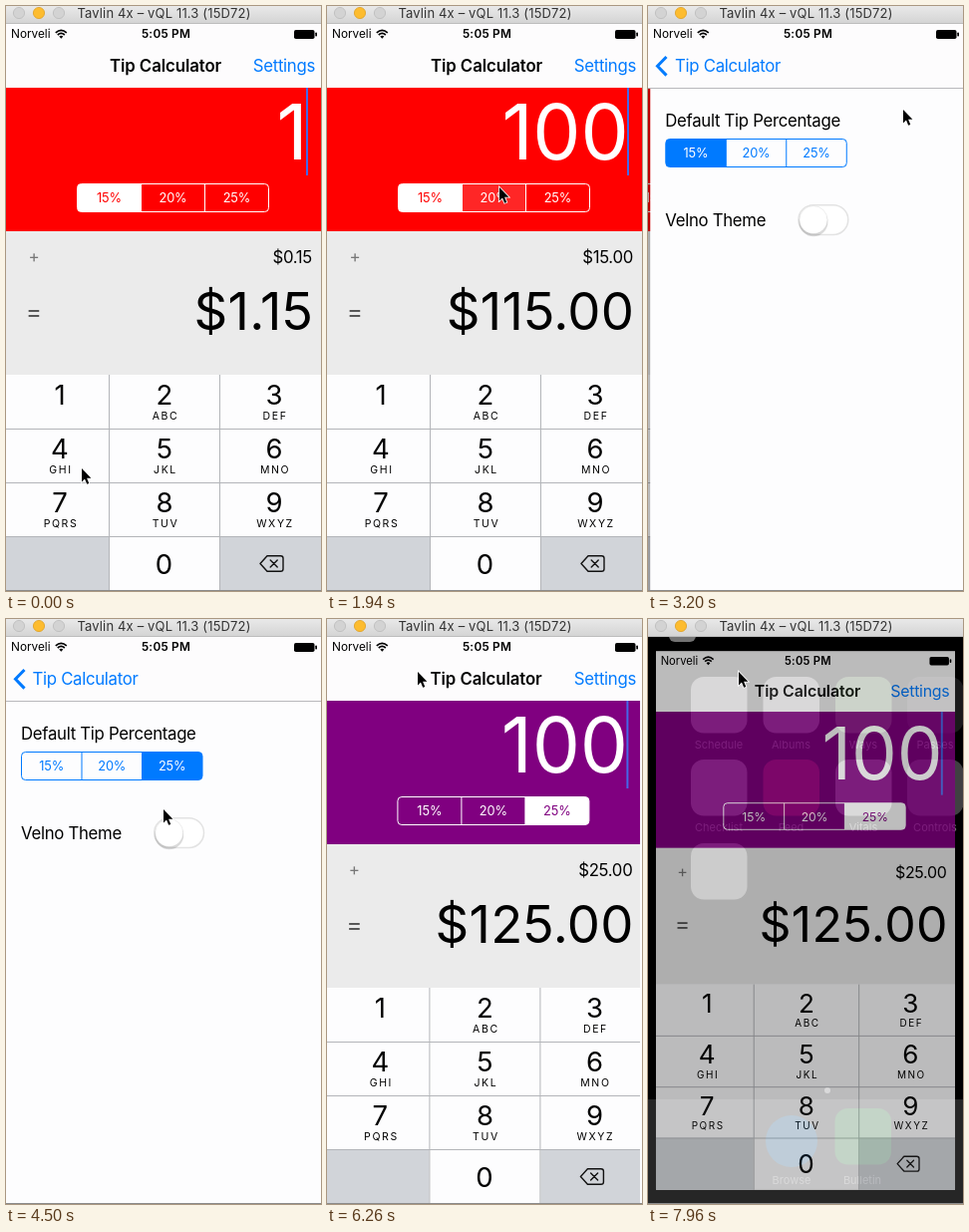
Animation, 316 px wide and 587 px high, one loop 8 s. Source, as an HTML page:

```html
<!DOCTYPE html>
<html lang="en">
<head>
<meta charset="utf-8">
<title>Tip Calculator</title>
<style>
html, body { margin: 0; width: 100%; height: 100%; overflow: hidden; background: #000; }
svg { display: block; width: 316px; height: 587px; font-family: Inter, Roboto, "Open Sans", sans-serif; }
.body { font-size: 16.8px; letter-spacing: -.31px; }
.bold { font-size: 16.8px; font-weight: 600; letter-spacing: -.08px; }
.small { font-size: 12.8px; letter-spacing: -.1px; }
.bar { font-size: 11.8px; }
.digit { font-size: 27.5px; }
.abc { font-size: 10.5px; letter-spacing: 1.6px; }
.label { font-size: 11px; fill: #fff; }
.mid { text-anchor: middle; }
.end { text-anchor: end; }
</style>
</head>
<body>
<svg id="stage" viewBox="0 0 316 587" xmlns="http://www.w3.org/2000/svg"></svg>
<script>
const LOOP = 8000, BLUE = '#007aff', RED = '#ff0000', PURPLE = '#800080';

const text = (x, y, cls, str, attrs = '') =>
  `<text x="${x}" y="${y}" class="${cls}" ${attrs}>${str}</text>`;
const rect = (x, y, w, h, fill, attrs = '') =>
  `<rect x="${x}" y="${y}" width="${w}" height="${h}" fill="${fill}" ${attrs}/>`;

// Three-part segmented control
function segments(id, x, y, w, h) {
  const cw = w / 3;
  const cells = [15, 20, 25].map((n, i) =>
    rect(x + i * cw, y, cw, h, 'none', `id="${id}Cell${i}"`) +
    text(x + (i + .5) * cw, y + 18.8, 'small mid', n + '%', `id="${id}Text${i}"`)).join('');
  const lines = [1, 2].map(i => `M${x + i * cw} ${y}v${h}`).join('');
  return `<clipPath id="${id}Clip">${rect(x, y, w, h, '#000', 'rx="4"')}</clipPath>
    <g clip-path="url(#${id}Clip)">${cells}</g>
    <g id="${id}Frame" fill="none">${rect(x, y, w, h, 'none', 'rx="4"')}<path d="${lines}"/></g>`;
}

function keypad() {
  const cols = [54, 159, 269];
  const letters = ['', 'ABC', 'DEF', 'GHI', 'JKL', 'MNO', 'PQRS', 'TUV', 'WXYZ'];
  const keys = letters.map((abc, i) => {
    const x = cols[i % 3], y = 400 + 54 * Math.floor(i / 3);
    return text(x, y, 'digit mid', i + 1) + text(x + 1, y + 15, 'abc mid', abc);
  }).join('');
  return rect(0, 370, 316, 217, '#fdfdfe') +
    rect(0, 532, 103, 55, '#d1d4d9') + rect(215, 532, 101, 55, '#d1d4d9') +
    rect(104, 533, 110, 54, '#fdfdfe', 'id="zero"') +
    '<path d="M103.5 370V587M214.5 370V587M0 424.5H316M0 478.5H316M0 532.5H316" stroke="#b3b5b9"/>' +
    keys + text(158.5, 569.5, 'digit mid', '0') +
    `<g fill="none" stroke="#111" stroke-width="1.4" stroke-linejoin="round" stroke-linecap="round">
      <path d="M255 559.5L262 551.7H275.5Q278 551.7 278 554V565Q278 567.3 275.5 567.3H262Z"/>
      <path d="M265.2 556l7 7M272.2 556l-7 7"/></g>`;
}

function springboard() {
  const cols = [43, 115.5, 188, 260];
  const apps = [
    ['Schedule', '#fff'], ['Albums', '#fff'], ['Ways', '#8fce7e'], ['Passes', '#3a3a3c'],
    ['Checklist', '#fff'], ['Feed', '#ff3b5c'], ['Vitals', '#fff'], ['Controls', '#8e8e93']
  ];
  const icon = (x, y, c) => rect(x, y, 56.5, 56.5, c, 'rx="13"');
  return rect(0, 482, 316, 105, '#555') + apps.map(([name, c], i) => {
    const x = cols[i % 4], y = i < 4 ? 58 : 141;
    return icon(x, y, c) + text(x + 28, y + 72, 'label mid', name);
  }).join('') + icon(43, 225, '#fff') + rect(21, 6, 27, 17, '#fff', 'rx="6"') +
    '<circle cx="180" cy="473" r="3" fill="#fff"/>' +
    '<circle cx="144" cy="524" r="26" fill="#1e9bf6"/>' + icon(187.5, 491, '#4cd964') +
    text(144, 567, 'label mid', 'Browse') + text(215, 567, 'label mid', 'Bulletin');
}

const home = `<g id="home">
  ${rect(0, 82, 316, 144, RED, 'id="panel"')}
  ${rect(0, 226, 316, 144, '#ebebeb')}
  ${text(302.5, 154, 'end', '', 'id="bill" font-size="76.5" letter-spacing="-.2" fill="#fff"')}
  ${rect(301, 82, 2, 88, '#4468e8', 'id="caret"')}
  ${segments('home', 71.5, 178.5, 192, 28)}
  ${text(28, 257, 'mid', '+', 'font-size="17" fill="#777"')}
  ${text(28, 314.7, 'mid', '=', 'font-size="24" fill="#555"')}
  ${text(307, 257.5, 'body end', '', 'id="tip"')}
  ${text(308.3, 325, 'end', '', 'id="total" font-size="52.6" letter-spacing=".3"')}
  ${keypad()}
  ${rect(0, 82, 316, 505, '#000', 'id="shade"')}</g>`;

const prefs = `<g id="prefs">
  ${rect(-9, 82, 9, 505, 'url(#edge)', 'id="shadow"')}
  ${rect(0, 82, 316, 505, '#fdfdfe')}
  ${text(15, 120.5, 'body', 'Default Tip Percentage')}
  ${segments('prefs', 15.5, 133.5, 181.5, 28)}
  ${text(15, 220.5, 'body', 'Velno Theme')}
  ${rect(148.7, 199.7, 49.8, 29.8, '#fff', 'id="track" rx="14.9" stroke-width="1.5"')}
  <g id="knob"><circle cy="216.8" r="14.5" fill="#000" opacity=".14"/>
  <circle cy="214.6" r="14" fill="#fff" stroke="#000" stroke-opacity=".12" stroke-width=".6"/></g></g>`;

const nav = `${rect(0, 18, 316, 64, '#fdfcfd')}
  ${text(5, 32, 'bar', 'Norveli')}
  <g fill="none" stroke="#000" stroke-width="1.7">
    <path d="M49.8 26.8Q55.3 21.8 60.8 26.8M51.8 29Q55.3 25.8 58.8 29"/></g>
  <path d="M53.3 30.6Q55.3 28.8 57.3 30.6L55.3 32.8Z"/>
  ${text(160.5, 32, 'bar mid', '5:05 PM', 'font-weight="600" letter-spacing=".25"')}
  ${rect(289, 24, 20.5, 9, '#000', 'rx="1.8"')}${rect(310.3, 26.5, 1.7, 4, '#000', 'rx=".8"')}
  <g id="heading">${text(104, 66, 'bold', 'Tip Calculator')}</g>
  <g id="settings">${text(310, 66, 'body end', 'Settings', `fill="${BLUE}"`)}</g>
  <g id="back"><path id="chevron" d="M18.5 51L9.5 60.3L18.5 69.6" fill="none" stroke="${BLUE}" stroke-width="3"/>
  <g id="backText">${text(26.5, 66, 'body', 'Tip Calculator', `fill="${BLUE}"`)}</g></g>
  ${rect(0, 82, 316, 1, '#b9b9bc', 'id="hairline"')}`;

const windowBar = rect(0, 0, 316, 18, 'url(#chrome)') + rect(0, 17, 316, 1, '#bdbdbd') +
  [['#d3d3d3', '#bcbcbc'], ['#fdbc2f', '#dfa023'], ['#d3d3d3', '#bcbcbc']].map(([f, s], i) =>
    `<circle cx="${13 + 20 * i}" cy="7" r="5.6" fill="${f}" stroke="${s}" stroke-width=".8"/>`).join('') +
  text(158.5, 12, 'mid', 'Tavlin 4x – vQL 11.3 (15D72)', 'font-size="13" letter-spacing=".15" fill="#333"');

document.getElementById('stage').innerHTML = `<defs>
  <linearGradient id="chrome" x2="0" y2="1"><stop stop-color="#e9e9e9"/><stop offset="1" stop-color="#d3d3d3"/></linearGradient>
  <linearGradient id="edge"><stop stop-opacity="0"/><stop offset="1" stop-opacity=".2"/></linearGradient>
  <clipPath id="screen">${rect(0, 18, 316, 569, '#000')}</clipPath></defs>
  ${rect(0, 0, 316, 587, '#000')}
  <g id="board" opacity=".45">${springboard()}</g>
  <g id="app"><g clip-path="url(#screen)">${rect(0, 18, 316, 569, '#fdfdfe')}${home}${prefs}${nav}</g></g>
  ${windowBar}${rect(0, 586, 316, 1, '#8c8c8c')}
  <path id="pointer" d="M0 0V13.4L3 10.6L5.2 15.8L7.3 14.9L5.1 9.8H9.4Z" stroke="#fff" stroke-width="1.6" paint-order="stroke"/>`;

const el = {};
document.querySelectorAll('#stage [id]').forEach(n => el[n.id] = n);
const set = (id, name, value) => el[id].setAttribute(name, value);
const move = (id, x, y = 0) => set(id, 'transform', `translate(${x} ${y})`);
const mix = (a, b, k) => a + (b - a) * k;
const clamp = v => Math.max(0, Math.min(1, v));
const smooth = v => { v = clamp(v); return v * v * (3 - 2 * v); };

// Rows are [time, ...values]
function track(rows, t) {
  const i = rows.findIndex(r => r[0] > t);
  if (i === 0) return rows[0].slice(1);
  if (i < 0) return rows[rows.length - 1].slice(1);
  const a = rows[i - 1], b = rows[i], k = smooth((t - a[0]) / (b[0] - a[0]));
  return a.slice(1).map((v, j) => mix(v, b[j + 1], k));
}

const PATH = [
  [60, 76, 464], [290, 150, 562], [600, 150, 562], [850, 148, 422], [1330, 173, 182],
  [2150, 173, 182], [2660, 274, 57], [2920, 274, 57], [3200, 256, 104], [3600, 143, 202],
  [3760, 114, 141], [3960, 114, 141], [4080, 153, 139], [4340, 153, 139], [4500, 158, 191],
  [4640, 172, 218], [5180, 172, 218], [5490, 91, 53]
];
const CARET = [
  [1180, 1], [1300, 0], [1650, 0], [1730, 1], [2150, 1], [2250, 0], [2560, 0], [2660, 1],
  [6890, 1], [6960, 0], [7420, 0], [7560, 1]
];

function spring(ms) {
  const x = 17.5 * Math.max(0, ms) / 1000;
  return 1 - (1 + x) * Math.exp(-x);
}

function paintSegments(id, chosen, pressed, ink, paper) {
  set(id + 'Frame', 'stroke', ink);
  for (let i = 0; i < 3; i++) {
    set(id + 'Cell' + i, 'fill', i === chosen || i === pressed ? ink : 'none');
    set(id + 'Cell' + i, 'fill-opacity', i === chosen ? 1 : .15);
    set(id + 'Text' + i, 'fill', i === chosen ? paper : ink);
  }
}

const within = (t, a, b) => t >= a && t < b;

function draw(t) {
  // Bill, tip and theme
  const bill = t < 340 ? 1 : t < 560 ? 10 : 100;
  const chosen = t < 2050 ? 0 : t < 5850 ? 1 : 2;
  const tip = bill * [.15, .2, .25][chosen];
  const theme = t < 4950 ? RED : PURPLE;
  el.bill.textContent = bill;
  el.tip.textContent = '$' + tip.toFixed(2);
  el.total.textContent = '$' + (bill + tip).toFixed(2);
  set('panel', 'fill', theme);
  set('caret', 'opacity', track(CARET, t)[0]);
  set('zero', 'fill', within(t, 300, 380) || within(t, 520, 600) ? '#d1d4d9' : '#fdfdfe');
  paintSegments('home', chosen, within(t, 1940, 2050) ? 1 : -1, '#fff', theme);

  // Settings page
  paintSegments('prefs', t < 4330 ? 0 : 2, within(t, 4250, 4330) ? 2 : -1, BLUE, '#fff');
  const on = smooth((t - 4940) / 270);
  move('knob', mix(163.7, 183.5, on));
  const tint = [[255, 76], [255, 217], [255, 100]].map(c => Math.round(mix(c[0], c[1], on)));
  set('track', 'fill', `rgb(${tint})`);
  set('track', 'stroke', on > .1 ? `rgb(${tint})` : '#e3e3e3');

  // Push and pop
  let p = t < 5850 ? spring(t - 2800) : 1 - spring(t - 5850);
  if (p < .001) p = 0;
  if (p > .999) p = 1;
  move('home', -95 * p);
  set('shade', 'opacity', .12 * p);
  move('prefs', 316 * (1 - p));
  set('prefs', 'visibility', p ? 'visible' : 'hidden');
  set('shadow', 'opacity', p < 1 ? p : 0);
  move('heading', -77 * p);
  set('heading', 'opacity', clamp(1 - 1.6 * p));
  set('settings', 'opacity', within(t, 2780, 2810) ? .2 : clamp(1 - 1.6 * p));
  move('backText', 77 * (1 - p));
  set('chevron', 'opacity', p);
  set('back', 'opacity', within(t, 5820, 5870) ? .2 : clamp(1.6 * p - .6));
  set('hairline', 'opacity', p);

  // Leaving the app
  const q = clamp((t - 7845) / 115), s = 1 - .05 * q * q;
  set('app', 'transform', `translate(${158 * (1 - s)} ${302.5 * (1 - s)}) scale(${s})`);
  set('app', 'opacity', 1 - .26 * q);
  set('board', 'visibility', q ? 'visible' : 'hidden');

  move('pointer', ...track(PATH, t));
}

const start = performance.now();
function tick() {
  draw((performance.now() - start) % LOOP);
  requestAnimationFrame(tick);
}
tick();
</script>
</body>
</html>
```
